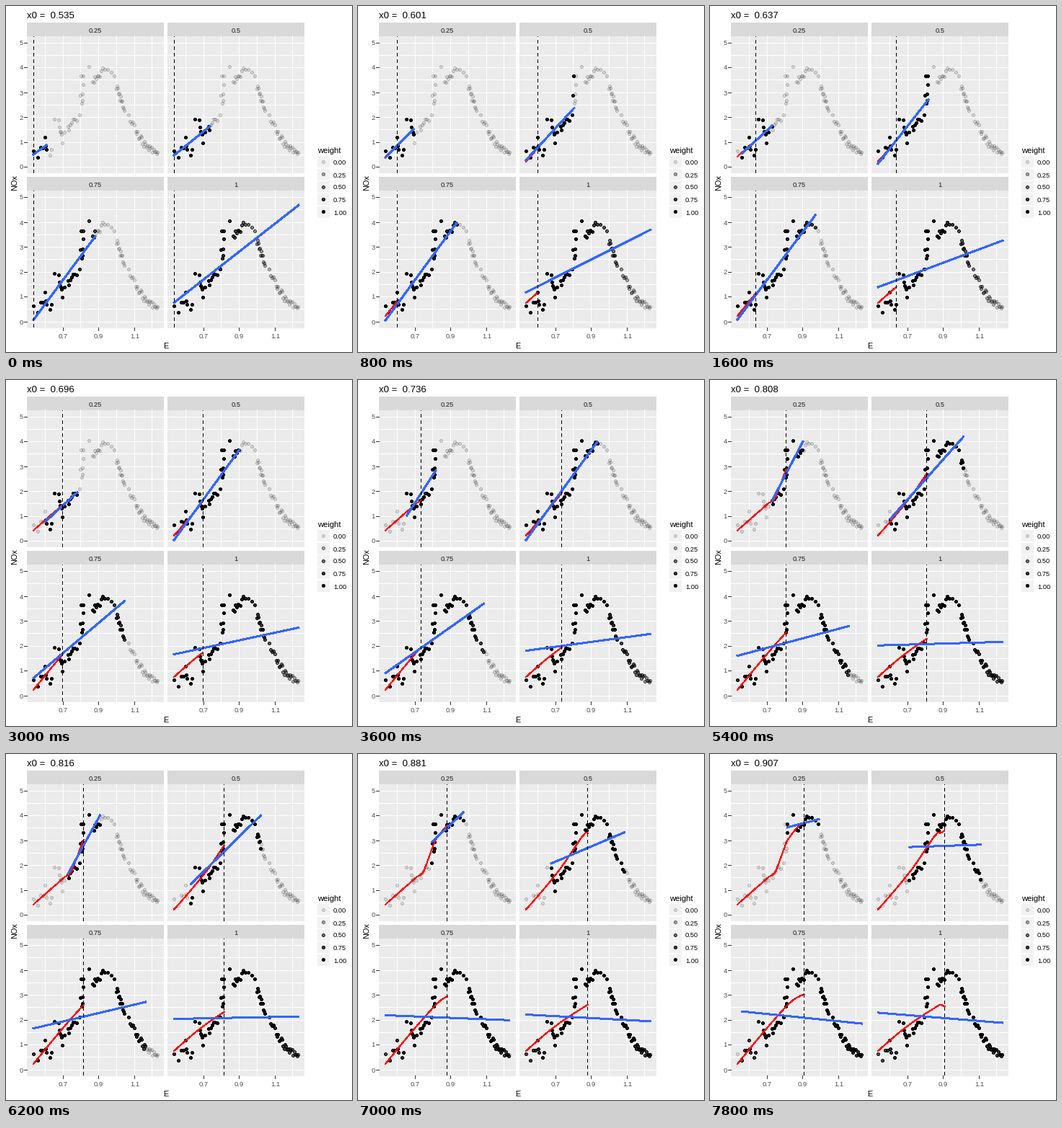
A matplotlib script that plays this animation: 480x480 px, repeating every 8000 ms.

```python
import numpy as np
import matplotlib.pyplot as plt
from matplotlib.animation import FuncAnimation
from matplotlib.patches import Rectangle
from matplotlib.path import Path

SIZE, DPI = 480, 80
PT = 72 / DPI                      # one pixel in points
INTERVAL, FRAMES = 200, 40
SPANS = (.25, .5, .75, 1)
LEFT = (29.5, 224.5, 29.5, 224.5)
TOP = (42, 42, 256.5, 256.5)
SIDE = 190

# Shape of the point cloud: (rank, E, NOx), straight in between
SHAPE = np.array([
    (0, .535, .5), (1, .562, .37), (4, .601, 1.15), (6, .608, .6),
    (7, .63, .57), (8, .637, .57), (9, .655, 1.9), (10, .676, 1.75),
    (15, .696, 1), (17, .729, 1.5), (22, .765, 1.85), (24, .795, 2.1),
    (26, .804, 3.65), (27, .808, 2.4), (31, .816, 3.6), (32, .846, 3.9),
    (33, .868, 3.4), (39, .907, 3.7), (42, .934, 4), (45, .99, 3.75),
    (46, 1.001, 3.2), (57, 1.045, 2.3), (58, 1.07, 1.95), (63, 1.108, 1.45),
    (71, 1.152, .95), (85, 1.232, .55)])
RANK = np.arange(86)
E = np.round(np.interp(RANK, SHAPE[:, 0], SHAPE[:, 1]), 3)
NOX = np.interp(RANK, SHAPE[:, 0], SHAPE[:, 2])
NOX += np.random.default_rng(4).uniform(-.15, .15, len(RANK))

# Half-width that holds a given share of all pairwise distances
REACH = .7 * (1 - np.sqrt(1 - np.array(SPANS)))


def tricube(d, reach):
    return (1 - np.minimum(d / reach, 1) ** 3) ** 3


def fit(w):
    return np.polyfit(E, NOX, 1, w=np.sqrt(w))


def window(x0, reach):
    """Point weights, x range and line for the window around x0."""
    d = np.abs(E - x0)
    inside = d <= reach
    w = tricube(d, REACH[-1]) * inside
    return w, E[inside][[0, -1]], fit(w)


def loess(x0, span):
    d = np.abs(E - x0)
    reach = np.sort(d)[int(span * len(E)) - 1]
    return np.polyval(fit(tricube(d, reach)), x0)


X0 = E[:FRAMES]
WINDOWS = [[window(x0, r) for r in REACH] for x0 in X0]
CURVES = [[loess(x0, s) for x0 in X0] for s in SPANS]


def to_x(panel, x):
    return LEFT[panel] + (np.asarray(x) - .50015) * 247.8


def to_y(panel, y):
    return TOP[panel] + 181.5 - np.asarray(y) * 34.5


def snap(v):
    return np.floor(v) + .5


plt.rcParams["font.family"] = "Liberation Sans"
fig = plt.figure(figsize=(SIZE / DPI, SIZE / DPI), dpi=DPI, facecolor="white")
ax = fig.add_axes([0, 0, 1, 1])
ax.set(xlim=(0, SIZE), ylim=(SIZE, 0))
ax.axis("off")


def box(x, y, w, h, color):
    ax.add_patch(Rectangle((x, y), w, h, fc=color, lw=0, aa=False, zorder=0))


def line(xs, ys, color, width=1, z=1, **kw):
    return ax.plot(xs, ys, color=color, lw=width * PT, aa=False, snap=False,
                   zorder=z, **kw)[0]


def label(x, y, s, size, color="black", ha="center", va="baseline", **kw):
    return ax.text(x, y, s, size=size * PT, color=color, ha=ha, va=va, **kw)


def shade(layers, weight):
    rgba = np.zeros((len(weight), 4))
    rgba[:, 3] = .12 + .88 * np.asarray(weight)
    for layer in layers:
        layer.set_facecolor(rgba)


def dots(xs, ys, weight):
    """Five-pixel marks: translucent disc with a translucent rim on top."""
    corner = np.array([(1.5, 2.5), (1.5, 1.5), (2.5, 1.5)])
    turn = np.array([(0, -1), (1, 0)])
    outer = np.vstack([corner @ np.linalg.matrix_power(turn, k)
                       for k in range(4)])
    outer = np.vstack([outer, outer[:1]])
    inner = 1.5 * np.array([(-1, -1), (1, -1), (1, 1), (-1, 1), (-1, -1)])
    disc = Path(outer, closed=True)
    rim = Path.make_compound_path(disc, Path(inner, closed=True))
    layers = [ax.scatter(snap(xs), snap(ys), s=(5 * PT) ** 2, marker=m,
                         linewidths=0, antialiaseds=False, zorder=3)
              for m in (disc, rim)]
    shade(layers, weight)
    return layers


# Panels, strips and axes
for p, span in enumerate(SPANS):
    x, y = int(LEFT[p]), int(TOP[p])
    height = SIDE + (p > 1)
    box(x, y - 19, SIDE, 19, "#d9d9d9")
    box(x, y, SIDE, height, "#ebebeb")
    for v in np.arange(.6, 1.25, .1):
        gx = snap(to_x(p, v))
        line([gx, gx], [y, y + height], "white")
    for v in np.arange(0, 5.1, .5):
        gy = snap(to_y(p, v))
        line([x, x + SIDE], [gy, gy], "white")
    label(x + SIDE / 2, y - 5, f"{span:g}", 9.4, "#1a1a1a")
    if p % 2 == 0:
        for v in range(6):
            gy = snap(to_y(p, v))
            line([26, 29], [gy, gy], "#333333")
            label(24, gy + 3, str(v), 9.4, "#4d4d4d", ha="right")
    if p > 1:
        for v in (.7, .9, 1.1):
            gx = snap(to_x(p, v))
            line([gx, gx], [447, 450], "#333333")
            label(gx, 461, f"{v}", 9.4, "#4d4d4d")

label(221.5, 475, "E", 11)
label(12.5, 245, "NOx", 11, va="center", rotation=90)
title = label(29, 17, "", 13.2, ha="left")

# Legend
label(432, 204, "weight", 11.2, ha="left")
KEYS = np.linspace(0, 1, 5)
KEY_Y = 216.6 + 17.28 * np.arange(5)
for k, y in zip(KEYS, KEY_Y):
    box(432, round(y - 8.1), 17, 16, "#f2f2f2")
    label(454, round(y) + 3.5, f"{k:.2f}", 9.4, ha="left")
dots(np.full(5, 440.0), KEY_Y, KEYS)

points = dots(np.concatenate([to_x(p, E) for p in range(4)]),
              np.concatenate([to_y(p, NOX) for p in range(4)]),
              np.zeros(4 * len(E)))
trails = [line([], [], "red", 1.05, 4) for _ in SPANS]
smooths = [line([], [], "#3366ff", 2, 5) for _ in SPANS]
markers = [line([], [], "black", 1, 6, dashes=(4, 4), dash_capstyle="butt")
           for _ in SPANS]


def draw(i):
    x0 = X0[i]
    title.set_text(f"x0 =  {x0:.3f}")
    shade(points, np.concatenate([w for w, _, _ in WINDOWS[i]]))
    for p in range(4):
        _, ends, coef = WINDOWS[i][p]
        smooths[p].set_data(to_x(p, ends), to_y(p, np.polyval(coef, ends)))
        trails[p].set_data(to_x(p, X0[:i + 1]), to_y(p, CURVES[p][:i + 1]))
        vx = snap(to_x(p, x0))
        markers[p].set_data([vx, vx], [int(TOP[p]) + SIDE, int(TOP[p])])
    return [title, *points, *trails, *smooths, *markers]


anim = FuncAnimation(fig, draw, frames=FRAMES, interval=INTERVAL,
                     init_func=lambda: draw(0), repeat=True, repeat_delay=0)
plt.show()
```
